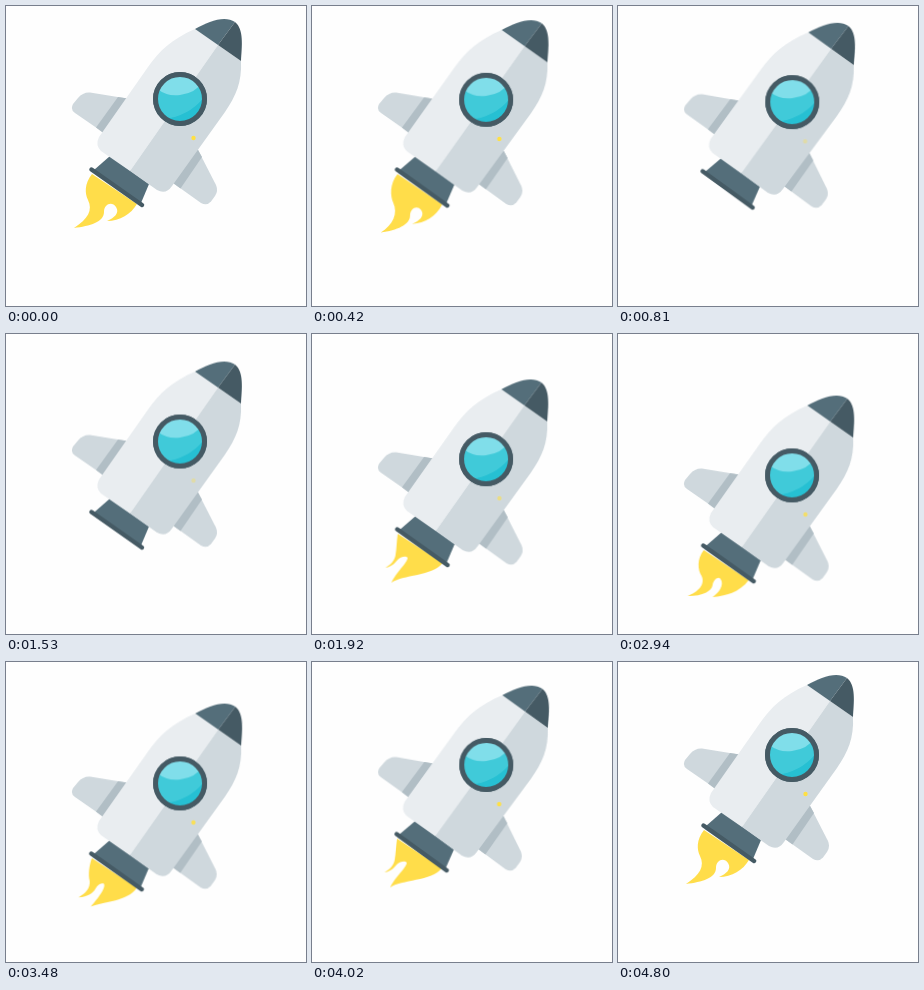
Animation of 300x300 px, one loop 4.83 s. Source, as an HTML page without scripts:

```html
<!DOCTYPE html>
<html lang="en">
<head>
<meta charset="utf-8">
<title>Hovering rocket</title>
<style>
  html, body { margin: 0; width: 100%; height: 100%; overflow: hidden; background: #fefefe; }
  svg { display: block; width: 100%; height: 100%; }

  .hover { animation: hover 4830ms infinite; }
  .sway { transform-origin: 150px 110px; animation: sway 805ms cubic-bezier(.37, 0, .63, 1) infinite alternate; }
  .flame { fill: #ffdd4a; animation: flame 4830ms ease-in-out infinite; }
  .spark { fill: #ffe043; animation: spark 4830ms linear infinite; }

  .light { fill: #e9edf0; }
  .shade { fill: #cfd8dd; }
  .fold { fill: #b1bec5; }
  .steel { fill: #546e7a; }
  .dark { fill: #455a64; }

  @keyframes hover {
    0% { transform: translateY(0); animation-timing-function: cubic-bezier(.88, 0, .62, 1); }
    54.66% { transform: translateY(52px); animation-timing-function: cubic-bezier(.3, 0, .46, 1); }
    100% { transform: translateY(0); }
  }
  @keyframes sway {
    to { transform: rotate(.9deg); }
  }
  @keyframes spark {
    0%, 11%, 83%, 100% { opacity: 1; }
    16%, 34% { opacity: .35; }
    48% { opacity: .9; }
    61% { opacity: .75; }
  }
  @keyframes flame {
    /* curled */
    0%, 54.2%, 99.38%, 100% {
      d: path("M86 168C78 178 79 188 82 194C87 204 82 213 68 222C84 220 98 216 98 206C98 198 106 195 110 201C114 207 108 212 101 215C114 215 125 208 131 198Z");
    }
    /* stretched */
    11.18% {
      d: path("M86 168C78 178 79 190 82 197C87 208 82 219 70 227C86 225 99 219 99 210C99 202 106 199 110 204C114 210 108 215 101 218C114 217 125 210 131 198Z");
    }
    /* tucked behind the nozzle */
    15.5%, 34% {
      d: path("M95 164C96 165 97 166 98 167C99 168 100 169 101 170C102 170 103 171 104 172C106 173 108 175 110 177C112 178 114 179 116 180C118 182 122 184 126 186Z");
    }
    /* short, leaning left */
    39.3%, 68.3%, 83.23% {
      d: path("M86 168C85 176 85 183 84 189C83 195 79 199 74 202C81 201 84 196 86 194C90 190 95 190 96 192C96 197 84 207 80 217C90 209 122 210 131 197Z");
    }
    /* forked */
    47.83%, 75.6% {
      d: path("M86 168C82 176 80 186 84 193C86 201 81 207 72 212C84 212 91 208 93 203C94 198 97 195 100 195C105 198 100 209 90 216C100 215 124 212 131 198Z");
    }
    60.87%, 91.1% {
      d: path("M86 168C79 177 80 188 84 194C88 203 80 210 70 214C86 214 94 209 95 203C96 197 101 194 103 197C107 203 101 211 95 215C108 214 122 210 131 198Z");
    }
  }
</style>
</head>
<body>
<svg viewBox="0 0 300 300">
  <defs>
    <clipPath id="glass"><circle cx="174" cy="93" r="23"/></clipPath>
  </defs>
  <g class="hover">
    <g class="sway">
      <path class="flame" d="M86 168C78 178 79 188 82 194C87 204 82 213 68 222C84 220 98 216 98 206C98 198 106 195 110 201C114 207 108 212 101 215C114 215 125 208 131 198Z"/>

      <g id="nozzle">
        <path class="steel" d="M104 150L143 178L135 197L88 164Z"/>
        <path d="M85.500 163.500L136 199" fill="none" stroke="#455a64" stroke-width="4.500" stroke-linecap="round"/>
      </g>

      <g id="fins">
        <path class="shade" d="M121 92.500L84 86.500Q77 86 72 92L67 98Q64 104 69 107L98 127Z"/>
        <path class="fold" d="M112 91L122 92.500L98 127.500L90 121.500Z"/>
        <path class="shade" d="M191 142L210 179Q212.500 185 209 190L205 195.500Q201 200 195 197L167 177Z"/>
        <path class="fold" d="M191 142L196 151L174.500 182.500L167 177Z"/>
      </g>

      <g id="body">
        <path class="light" d="M189 23C166 33 153 45 142 61L93 131Q89 139 95 145L124 165L212 39Z"/>
        <path class="shade" d="M235 55C236 76 230 90 219 106L166 180Q160 189 151 184L124 165L212 39Z"/>
        <path class="steel" d="M189 23C203 15 219 9 229 16L212 39Z"/>
        <path class="dark" d="M235 55C236 40 238 23 229 16L212 39Z"/>
      </g>

      <g id="window">
        <circle cx="174" cy="93" r="27" class="dark"/>
        <g clip-path="url(#glass)">
          <rect x="150" y="69" width="48" height="48" fill="#40cad9"/>
          <path d="M158 113Q184 110 199 90V120H158Z" fill="#26c0d3"/>
          <path d="M150 82Q161 91 174 89Q190 87 196 76V68H150Z" fill="#80deea"/>
        </g>
        <circle cx="174" cy="93" r="24.500" fill="none" stroke="#455a64" stroke-width="5"/>
      </g>

      <circle class="spark" cx="187.500" cy="132" r="2.200"/>
    </g>
  </g>
</svg>
</body>
</html>
```
